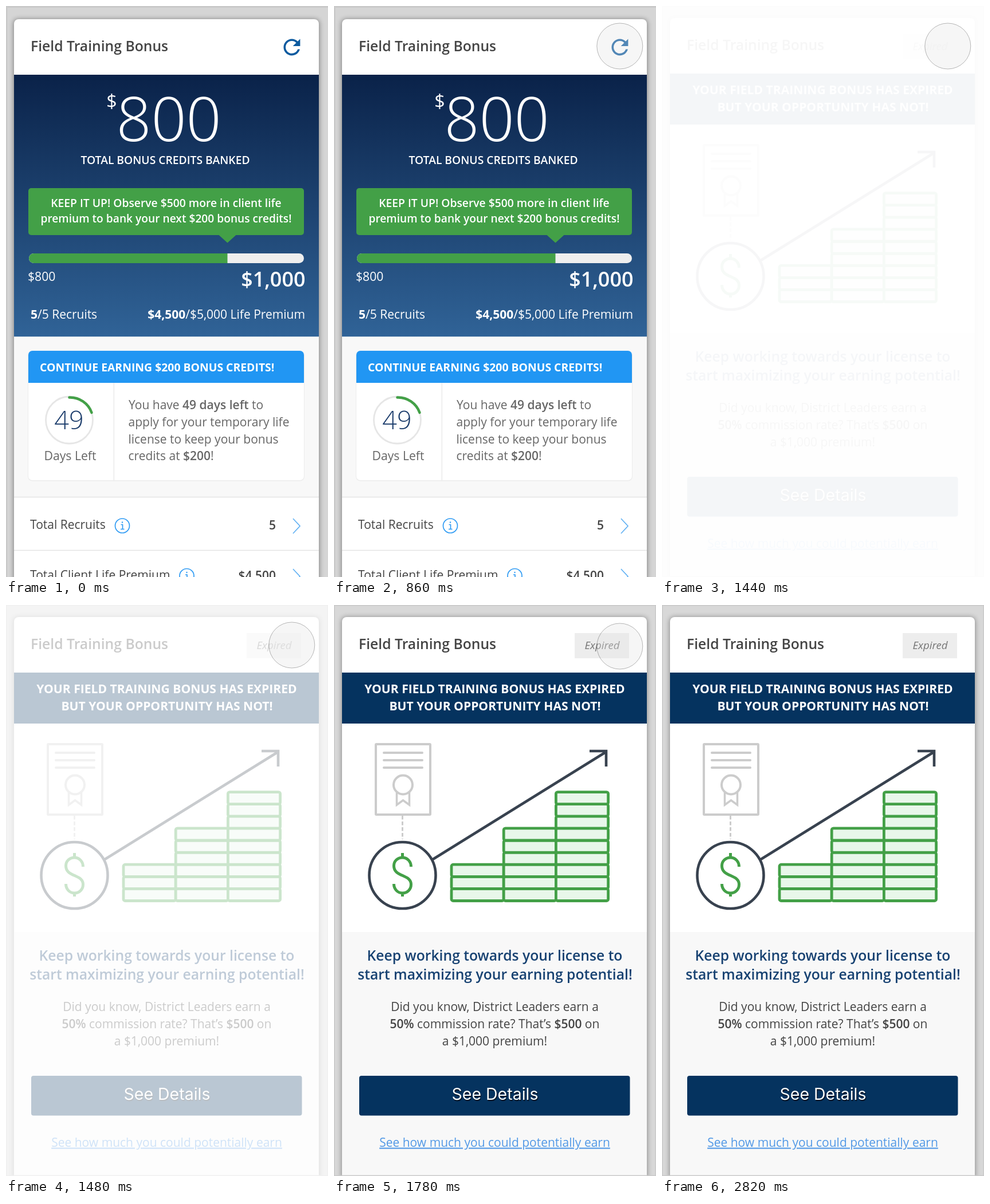
These frames come from a looping animation (562x997 px, 3740 ms). An HTML page:

```html
<!DOCTYPE html>
<html lang="en">
<head>
<meta charset="utf-8">
<title>Field Training Bonus</title>
<style>
  html, body { margin: 0; width: 100%; height: 100%; overflow: hidden; background: #fff; }
  svg { display: block; width: 100vw; height: 100vh; }
  text { font-family: "Open Sans", "Noto Sans", sans-serif; font-size: 21px; fill: #444; white-space: pre; }
  .w, .w text { fill: #fff; }
  .l { font-weight: 300; }
  .s { font-weight: 600; }
  .b { font-weight: 700; }
  .m { text-anchor: middle; }
  .e { text-anchor: end; }
  .line { fill: none; }
</style>
</head>
<body>
<svg viewBox="0 0 562 997" preserveAspectRatio="none">
  <defs>
    <linearGradient id="navy" x1="0" y1="0" x2="0" y2="1">
      <stop offset="0" stop-color="#0a2249"/>
      <stop offset="1" stop-color="#306397"/>
    </linearGradient>
    <filter id="soft" x="-10%" y="-10%" width="120%" height="120%">
      <feGaussianBlur stdDeviation="4"/>
    </filter>
    <clipPath id="panel"><rect x="39" y="602" width="481" height="226" rx="7"/></clipPath>
    <clipPath id="track"><rect x="40" y="432" width="480" height="17" rx="8.5"/></clipPath>
    <g id="info" class="line" stroke="#2f9bf3" stroke-width="1.7">
      <circle r="12.5"/>
      <path d="M-2.5 -2H0.5V6M-3 6H3.5"/>
      <circle cx="0" cy="-6" r="1.2" fill="#2f9bf3" stroke="none"/>
    </g>
    <path id="next" class="line" d="M-6 -13L6 0L-6 13" stroke="#64b2f3" stroke-width="1.7"/>
  </defs>

  <g id="before">
    <rect width="562" height="997" fill="#d5d5d5"/>
    <path class="line" d="M1 997V1.5H562" stroke="#cacaca" stroke-width="3"/>
    <rect x="13" y="23" width="534" height="1000" rx="8" fill="#000" opacity=".38" filter="url(#soft)"/>
    <rect x="14" y="23" width="532" height="1000" rx="8" fill="#fff"/>
    <text class="s" x="43" y="79" style="font-size:24.7px">Field Training Bonus</text>
    <path transform="translate(477.2 50.2) scale(1.81)" fill="#0b5a9f" d="M17.65 6.35C16.2 4.9 14.21 4 12 4c-4.42 0-7.99 3.58-7.99 8s3.57 8 7.99 8c3.73 0 6.84-2.55 7.73-6h-2.08c-.82 2.33-3.04 4-5.65 4-3.31 0-6-2.69-6-6s2.69-6 6-6c1.66 0 3.14.69 4.22 1.78L13 11h7V4z"/>

    <rect x="14" y="120" width="532" height="457.5" fill="url(#navy)"/>
    <g class="w">
      <text class="m" x="184.5" y="178" style="font-size:33px">$</text>
      <text class="m l" x="284" y="236" style="font-size:107px">800</text>
      <text class="m s" x="278" y="275.5" style="font-size:19.3px">TOTAL BONUS CREDITS BANKED</text>
      <rect x="39" y="318" width="481" height="82" rx="5" fill="#43a047"/>
      <path d="M371 399.500H402L386.500 413.500Z" fill="#43a047"/>
      <text class="m s" x="279.5" y="351" style="font-size:19.3px">KEEP IT UP! Observe $500 more in client life</text>
      <text class="m s" x="279.5" y="377.5" style="font-size:19.2px">premium to bank your next $200 bonus credits!</text>
      <g clip-path="url(#track)">
        <rect x="40" y="432" width="480" height="17" fill="#eee"/>
        <rect x="40" y="432" width="346.500" height="17" fill="#43a047"/>
      </g>
      <text x="38" y="479.5" style="font-size:21.2px">$800</text>
      <text class="e s" x="522.5" y="490" style="font-size:36px">$1,000</text>
      <text x="43" y="545.5"><tspan class="b">5</tspan>/5 Recruits</text>
      <text class="e" x="522" y="545.5"><tspan class="b">$4,500</tspan>/$5,000 Life Premium</text>
    </g>

    <rect x="14" y="577.5" width="532" height="280" fill="#f8f8f8"/>
    <rect x="38" y="602" width="483" height="227.500" rx="8" fill="#ececec"/>
    <g clip-path="url(#panel)">
      <rect x="39" y="602" width="481" height="226" fill="#fff"/>
      <rect x="39" y="602" width="481" height="56" fill="#2196f3"/>
      <rect x="187" y="658" width="2.500" height="170" fill="#f2f2f2"/>
    </g>
    <text class="b w" x="59" y="637.5" style="font-size:19.4px">CONTINUE EARNING $200 BONUS CREDITS!</text>
    <g class="line">
      <circle cx="110.5" cy="723" r="41" stroke="#e6e6e6" stroke-width="2.8"/>
      <path d="M110.500 683.500A40 40 0 0 1 149.500 710" stroke="#43a047" stroke-width="4.500" stroke-linecap="round"/>
    </g>
    <text class="m l" x="110" y="739" style="font-size:45px;fill:#1c3d6c">49</text>
    <g style="--c:#666" id="advice">
      <text class="m" x="112" y="793" style="font-size:21.2px;fill:#666">Days Left</text>
      <text x="214" y="704" style="fill:#666">You have <tspan class="s">49 days left</tspan> to</text>
      <text x="213.500" y="733.7" style="fill:#666">apply for your temporary life</text>
      <text x="213.500" y="763.5" style="fill:#666">license to keep your bonus</text>
      <text x="213.500" y="793" style="fill:#666">credits at <tspan class="s">$200</tspan>!</text>
    </g>

    <path d="M14 857.500H546M14 950.500H546" stroke="#e4e4e4" stroke-width="1.5"/>
    <text x="42" y="912.5">Total Recruits</text>
    <text class="e s" x="471" y="914">5</text>
    <use href="#info" x="203" y="907.5"/>
    <use href="#next" x="507" y="908"/>
    <text x="42" y="1000.5">Total Client Life Premium</text>
    <text class="e s" x="471" y="1002">$4,500</text>
    <use href="#info" x="315.500" y="995"/>
    <use href="#next" x="507" y="996"/>
  </g>

  <g id="after" opacity="0">
    <rect width="562" height="997" fill="#d8d8d8"/>
    <rect x="13" y="21" width="534" height="1000" rx="8" fill="#000" opacity=".34" filter="url(#soft)"/>
    <rect x="14" y="21" width="532" height="1000" rx="8" fill="#fff"/>
    <rect x="14" y="571" width="532" height="426" fill="#f8f8f8"/>
    <rect class="line" x=".75" y=".75" width="560.5" height="995.5" stroke="#cacaca" stroke-width="1.5"/>
    <text class="s" x="43" y="77" style="font-size:24.7px">Field Training Bonus</text>
    <rect x="420" y="49" width="95" height="44" fill="#ededed"/>
    <text class="m" x="468" y="77" style="font-size:18.7px;font-style:italic;fill:#777">Expired</text>

    <rect x="14" y="118" width="532" height="89" fill="#05335f"/>
    <text class="m b w" x="280.5" y="154" style="font-size:21.1px">YOUR FIELD TRAINING BONUS HAS EXPIRED</text>
    <text class="m b w" x="281" y="184" style="font-size:21.1px">BUT YOUR OPPORTUNITY HAS NOT!</text>

    <g class="line" stroke="#ccc" stroke-width="4">
      <rect x="73" y="243" width="95" height="123" rx="1"/>
      <path d="M87 258H154M87 271H154M87 284H154" stroke-linecap="round"/>
      <circle cx="120.5" cy="314" r="16.5"/>
      <path d="M109.500 327V349L120.500 341L131.500 349V327" stroke-width="3.500"/>
      <path d="M119.500 368V409" stroke-width="3" stroke-dasharray="6.500 3.500"/>
    </g>
    <g class="line" stroke="#38424f" stroke-width="4.6">
      <circle cx="119.5" cy="472" r="58"/>
      <path d="M171 445L474 257M446 255H475V282"/>
    </g>
    <path class="line" stroke="#43a047" stroke-width="5" d="M134.500 457c0-9-6.500-16-15-16s-15 6-15 14.500c0 20 30 14 30 32.500 0 8.500-6.500 15-15 15s-15-7-15-16M119.500 433V441M119.500 502V509"/>
    <g id="stacks" fill="#e8f7ea" stroke="#43a047" stroke-width="4.8"></g>

    <g class="m">
      <text class="s" x="280.5" y="621" style="font-size:24.7px;fill:#174272">Keep working towards your license to</text>
      <text class="s" x="281" y="654" style="font-size:24.7px;fill:#174272">start maximizing your earning potential!</text>
      <text x="280.5" y="709">Did you know, District Leaders earn a</text>
      <text x="280.5" y="739"><tspan class="s">50%</tspan> commission rate? That’s <tspan class="s">$500</tspan> on</text>
      <text x="280.5" y="769">a $1,000 premium!</text>
      <rect x="44" y="822" width="472.500" height="69.500" rx="4" fill="#05335f"/>
      <text class="w" x="281" y="863.5" style="font-family:Inter,Roboto,sans-serif;font-size:28.5px;text-shadow:1px 2px 1px #000a">See Details</text>
      <text x="280.5" y="945.5" style="fill:#5299e6;text-decoration:underline">See how much you could potentially earn</text>
    </g>
  </g>

  <circle id="touch" r="40" fill="#e4e4e4" fill-opacity=".33" stroke="#000" stroke-opacity=".28"/>
</svg>
<script>
  const LOOP = 3740, STEP = 20;
  const el = id => document.getElementById(id);
  const [before, after, touch, stacks] = ["before", "after", "touch", "stacks"].map(el);
  const part = (t, from, to) => Math.min(1, Math.max(0, (t - from) / (to - from)));
  const mix = (a, b, p) => a + (b - a) * p;

  // Three stacks of notes: 3, 6 and 9 high
  let notes = "";
  for (let col = 0; col < 3; col++) {
    for (let row = 1; row <= 3 * (col + 1); row++) {
      notes += `<rect x="${205 + 91.2 * col}" y="${516.5 - 21.1 * row}" width="91.2" height="21.1" rx="3"/>`;
    }
  }
  stacks.innerHTML = notes;

  function touchAt(t) {
    if (t < 820) {
      const p = part(t, 230, 740);
      return [mix(513, 500, p ** 1.2), mix(-40, 69, 1 - (1 - p) ** 3.3), 39.8];
    }
    if (t < 860) return [499.5, 69.5, 41.2];
    if (t < 2600) return [498.8, mix(70, 72, part(t, 1540, 1780)), 40];
    const p = part(t, 2580, 2820);
    return [mix(498.8, 500, p), mix(72, -42, p * p), 40];
  }

  function draw(time) {
    const t = Math.floor((time % LOOP) / STEP) * STEP;
    const swapped = t >= 1440;
    before.style.display = swapped ? "none" : "";
    after.setAttribute("opacity", swapped ? 1 - (1 - part(t, 1434, 1780)) ** 2.2 : 0);

    const [x, y, r] = touchAt(t);
    touch.setAttribute("cx", x);
    touch.setAttribute("cy", y);
    touch.setAttribute("r", r);
    touch.style.display = t >= 240 && t < 2820 ? "" : "none";
  }

  const start = performance.now();
  function tick() {
    draw(performance.now() - start);
    requestAnimationFrame(tick);
  }
  tick();
</script>
</body>
</html>
```
